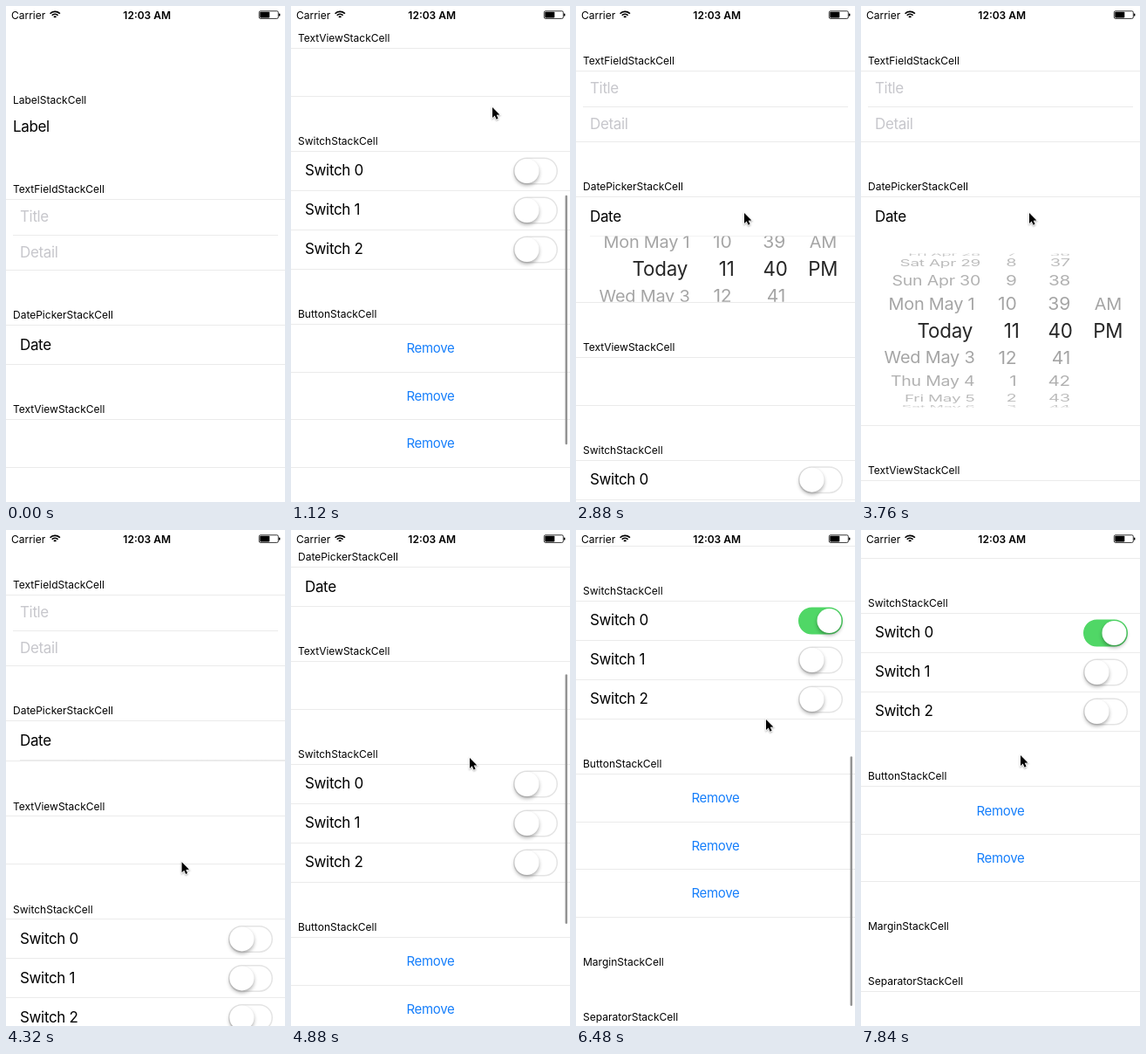
Recreate the animation shown at these times as an HTML page with a canvas. Size 320 by 568 pixels, loop 8000 ms.

```html
<!DOCTYPE html>
<html lang="en">
<head>
<meta charset="utf-8">
<title>Stack cells</title>
<style>
html, body { margin: 0; width: 100%; height: 100%; overflow: hidden; background: #fff; }
canvas { display: block; width: 320px; height: 568px; }
</style>
</head>
<body>
<canvas id="stage"></canvas>
<script>
const W = 320, H = 568, LOOP = 8000, BUTTON = 54.5;
const FONT = 'Inter, "Liberation Sans", sans-serif';
const canvas = document.getElementById('stage');
const dpr = window.devicePixelRatio || 1;
canvas.width = W * dpr;
canvas.height = H * dpr;
const ctx = canvas.getContext('2d');

// Eased step from 0 to 1 between two times
function ease(t, from, to) {
  const u = Math.min(1, Math.max(0, (t - from) / (to - from)));
  return u * u * (3 - 2 * u);
}

// Rubber band: 0 to 1 and back to 0
const bounce = (t, from, to) => Math.sin(Math.PI * ease(t, from, to));

// Critically damped spring from 0 to 1
function spring(ms) {
  const x = Math.max(0, ms) * 0.0154;
  return 1 - (1 + x) * Math.exp(-x);
}

// The whole scene as a function of time
function sceneAt(t) {
  const e = (from, to) => ease(t, from, to);
  // Finger travel while dragging; the content follows it
  const drag = -378 * e(640, 1080) + 403 * e(1620, 2180)
    - 350 * e(4640, 5120) + 40 * e(6300, 6480) - 3 * e(6490, 6600);
  // Momentum after a release, with an overshoot at the end of the list
  const glide = 172 * e(1000, 1350) + 9 * bounce(t, 1250, 1580)
    + 53 * e(5080, 5560) + 13 * bounce(t, 5520, 5900);
  // Free pointer travel between the gestures
  const moveX = 10 * e(640, 1080) - 38 * e(2250, 2720) + 12 * e(3880, 4560)
    + 76 * e(5850, 6050) - 63 * e(6100, 6300) - 35 * e(6750, 7150);
  const moveY = 73 * e(300, 480) - 282 * e(2250, 2720) + 200 * e(3880, 4560)
    - 24 * e(5850, 6050) + 114 * e(6100, 6300) + 86 * e(6750, 7150) - 42 * e(7450, 7780);
  const gone = spring(t - 7290);
  return {
    scroll: Math.round(glide - drag - 17 * gone),
    x: 221 + moveX,
    y: 421 + drag + moveY,
    open: spring(t - 2801) - spring(t - 3860),
    gone,
    on: e(6090, 6300),
    bar: e(640, 720) - e(2240, 2560) + e(4600, 4700) - e(6850, 7150),
  };
}

function text(str, x, y, size, { color = '#000', align = 'left', weight = 400, gap = 0 } = {}) {
  ctx.font = `${weight} ${size}px ${FONT}`;
  ctx.letterSpacing = gap + 'px';
  ctx.textAlign = align;
  ctx.fillStyle = color;
  ctx.fillText(str, x, y + size * 0.364);
}

function line(y, x0 = 0, x1 = W) {
  ctx.fillStyle = '#ebebeb';
  ctx.fillRect(x0, Math.round(y), x1 - x0, 1);
}

function pill(x, y, w, h, r) {
  ctx.beginPath();
  ctx.roundRect(x, y, w, h, r);
}

function faded(alpha, paint) {
  ctx.globalAlpha = Math.min(1, Math.max(0, alpha));
  paint();
  ctx.globalAlpha = 1;
}

const body = (str, x, y, color) => text(str, x, y, 17, { color, gap: -0.35 });

// Section title with its top line; returns the y of that line
function section(name, y, ruled = true) {
  text(name + 'StackCell', 8, y, 12);
  if (ruled) line(y + 11);
  return y + 11;
}

function toggle(y, on) {
  pill(255.75, y - 14.75, 49.5, 29.5, 14.75);
  ctx.fillStyle = '#50d766';
  faded(on, () => ctx.fill());
  ctx.lineWidth = 1.5;
  ctx.strokeStyle = on > 0.5 ? '#50d766' : '#e4e4e4';
  ctx.stroke();
  ctx.save();
  ctx.shadowColor = 'rgba(0,0,0,.32)';
  ctx.shadowBlur = 4 * dpr;
  ctx.shadowOffsetY = 2.5 * dpr;
  ctx.fillStyle = '#fff';
  ctx.beginPath();
  ctx.arc(270.5 + 20 * on, y, 14, 0, 7);
  ctx.fill();
  ctx.restore();
}

// Wheel of rows on a cylinder, seen through a window that opens from its middle
function picker(top, height) {
  const mid = top + height / 2, half = Math.min(88, height / 2);
  ctx.save();
  ctx.beginPath();
  ctx.rect(0, mid - half, W, 2 * half);
  ctx.clip();
  for (let k = -4; k <= 4; k++) {
    const angle = k * 0.337, c = Math.cos(angle);
    const y = mid + 93.5 * Math.sin(angle) * (0.947 + 0.053 * c);
    const color = `rgba(0,0,0,${k ? 0.4 - 0.045 * Math.abs(k) : 0.85})`;
    const put = (str, x, align, size) => {
      ctx.save();
      ctx.translate(x, y);
      ctx.scale(0.88 + 0.12 * c, c);
      text(str, 0, 0, k ? size : 22.3, { color, align, gap: -0.2 });
      ctx.restore();
    };
    const date = new Date(2017, 4, 2 + k);
    const day = k ? date.toDateString().slice(0, 10).replace(' 0', ' ') : 'Today';
    put(day, date.getDate() > 9 ? 137 : k ? 130.5 : 128, 'right', 20);
    put(String((k + 10) % 12 + 1), k ? 178.5 : 181.5, 'right', 21.2);
    put(String(40 + k), k ? 240 : 242.5, 'right', 21.2);
    if (k === 0 || k === -1) put(k ? 'AM' : 'PM', 283.3, 'center', 20);
  }
  ctx.restore();
}

function statusBar() {
  text('Carrier', 6, 10.5, 12);
  text('12:03 AM', 161.7, 10.5, 12, { weight: 600, align: 'center' });
  ctx.strokeStyle = ctx.fillStyle = '#000';
  ctx.lineWidth = 1.7;
  for (let r = 1.7; r < 8; r += 3) {
    ctx.beginPath();
    ctx.arc(56.2, 14, r, -Math.PI * 0.76, -Math.PI * 0.24);
    ctx.stroke();
  }
  ctx.lineWidth = 0.8;
  pill(290.3, 5.8, 22, 8.6, 1.6);
  ctx.stroke();
  pill(291.3, 6.8, 11, 6.6, 0.8);
  ctx.fill();
  pill(313, 8.4, 1.4, 3.4, 0.7);
  ctx.fill();
}

function scrollBar(scroll, contentH) {
  const k = (H - 6) / contentH, top = 3 + scroll * k;
  ctx.fillStyle = '#949494';
  pill(314.5, top, 2.5, Math.min(H - 3, top + H * k) - top, 1.25);
  ctx.fill();
}

const arrow = new Path2D('M0 0V12L2.7 9.4 4.6 13.7 6.6 12.8 4.7 8.7 8.4 8.5Z');

function cursor(x, y) {
  ctx.save();
  ctx.translate(x, y);
  ctx.shadowColor = 'rgba(0,0,0,.35)';
  ctx.shadowBlur = 2 * dpr;
  ctx.shadowOffsetY = dpr;
  ctx.lineWidth = 1.4;
  ctx.strokeStyle = '#fff';
  ctx.stroke(arrow);
  ctx.shadowColor = 'transparent';
  ctx.fillStyle = '#000';
  ctx.fill(arrow);
  ctx.restore();
}

function list({ open, gone, on }) {
  const space = 52;
  section('Label', 107.5, false);
  body('Label', 8, 138);

  let y = section('TextField', 210);
  body('Title', 16, y + 20, '#c7c7cc');
  line(y + 40.5, 8, 312);
  body('Detail', 16, y + 60.5, '#c7c7cc');
  line(y += 81);

  y = section('DatePicker', y + space);
  body('Date', 16, y + 22.5);
  y += 45;
  if (open > 0.005) {
    picker(y, 217 * open);
    faded(1 - open * 1.2, () => line(y, 16));
  }
  line(y += 217 * open);

  y = section('TextView', y + space);
  line(y += 55);

  y = section('Switch', y + space);
  for (let i = 0; i < 3; i++) {
    body('Switch ' + i, 16, y + 22.3);
    toggle(y + 23, i ? 0 : on);
    line(y += 45);
  }

  y = section('Button', y + space) - BUTTON * gone;
  for (let i = 0; i < 3; i++) {
    faded(i ? 1 : 1 - gone, () => {
      text('Remove', 160, y + 28, 15, { color: '#157efb', align: 'center', gap: -0.3 });
      line(y + BUTTON);
    });
    y += BUTTON;
  }

  y = section('Margin', y + space, false);
  section('Separator', y + space);
}

function draw(t) {
  const scene = sceneAt(t);
  ctx.setTransform(dpr, 0, 0, dpr, 0, 0);
  ctx.fillStyle = '#fff';
  ctx.fillRect(0, 0, W, H);
  ctx.save();
  ctx.translate(0, -scene.scroll);
  list(scene);
  ctx.restore();
  faded(scene.bar, () => scrollBar(scene.scroll, 1118 - BUTTON * scene.gone));
  statusBar();
  if (t >= 320) cursor(scene.x, scene.y);
}

const start = performance.now();
function tick() {
  draw((performance.now() - start) % LOOP);
  requestAnimationFrame(tick);
}
tick();
</script>
</body>
</html>
```
